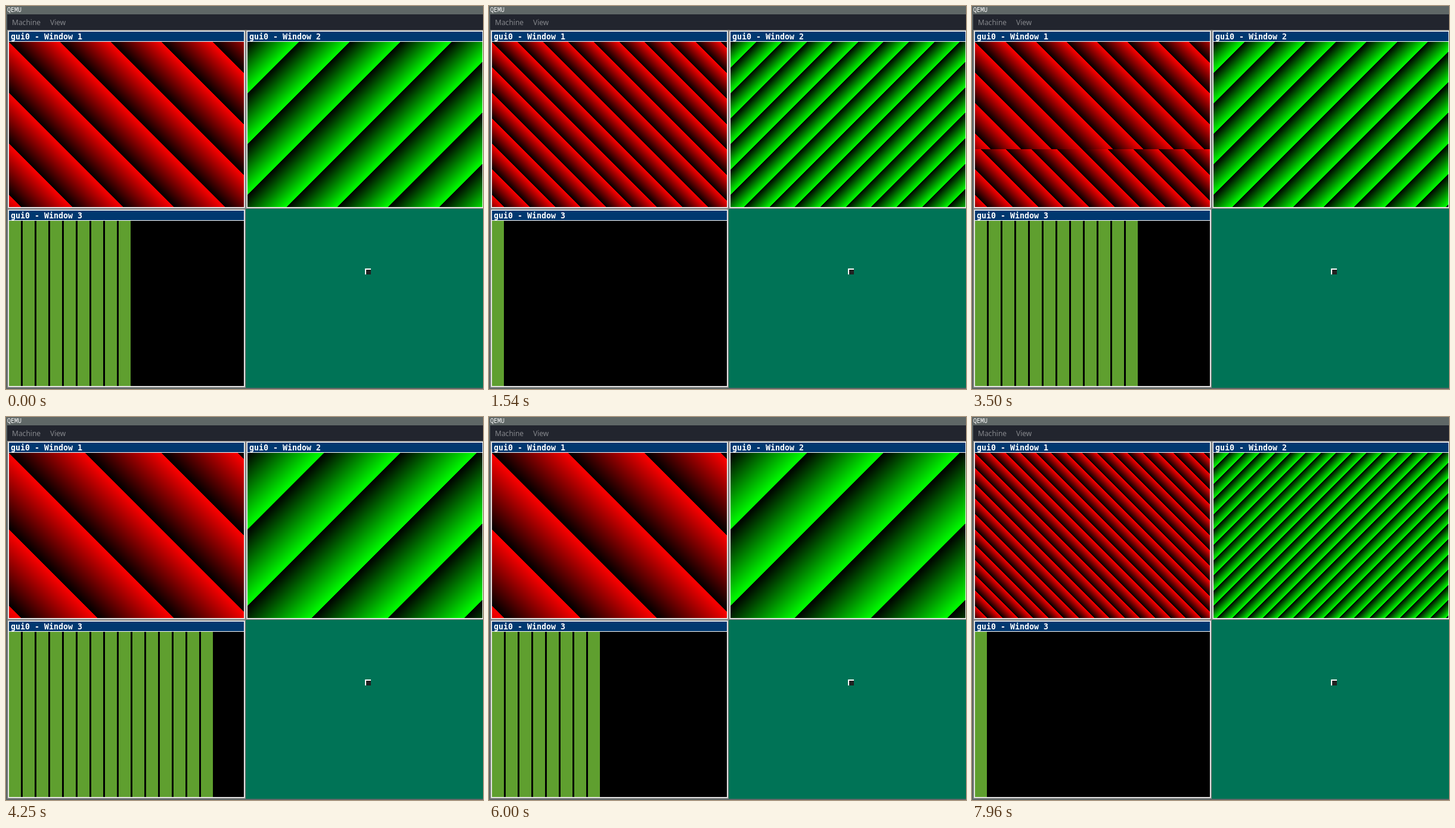
An HTML page with a canvas for the animation above (8 s loop, 800 px wide and 642 px high).

```html
<!DOCTYPE html>
<html lang="en">
<head>
<meta charset="utf-8">
<title>Desktop demo</title>
<style>
  html, body { margin: 0; width: 100%; height: 100%; overflow: hidden; background: #5f6766; }
  svg, canvas { position: absolute; left: 0; top: 0; display: block; }
  .host { font: 10px "Noto Sans Mono", "DejaVu Sans Mono", monospace; fill: #fff; }
  .menu { font: 12px "Noto Sans", sans-serif; fill: #85878c; }
  .title { font: bold 13.29px "DejaVu Sans Mono", monospace; fill: #fff; }
</style>
</head>
<body>
<canvas id="stage" width="800" height="642"></canvas>
<svg width="800" height="642">
  <text class="host" x="2" y="10">QEMU</text>
  <text class="menu" x="10" y="32">Machine</text>
  <text class="menu" x="74" y="32">View</text>
  <text class="title" x="8" y="56">gui0 - Window 1</text>
  <text class="title" x="408" y="56">gui0 - Window 2</text>
  <text class="title" x="8" y="356">gui0 - Window 3</text>
</svg>
<script>
const LOOP = 8000, W = 394, H = 277;
const PAINT = 0.1; // share of a step spent painting it
const ctx = document.getElementById('stage').getContext('2d');

// Steps done by each window at a few key times (ms); even pace in between.
const times = [0, 750, 1040, 1500, 2380, 3500, 4960, 6000, 7960];
const redSteps = [0, 4, 5, 6, 10, 15.96, 23, 28, 38];
const greenSteps = [0, 4, 5, 6, 9, 16, 23, 28, 38];
const barSteps = [9, 14, 16, 17, 22, 28, 34.988, 40, 49];

function progress(steps, t) {
  let i = 0;
  while (i < times.length - 2 && t >= times[i + 1]) i++;
  const u = Math.min(1, (t - times[i]) / (times[i + 1] - times[i]));
  const n = steps[i] + u * (steps[i + 1] - steps[i]) + PAINT;
  const step = Math.floor(n);
  return { step, rows: Math.round(H * Math.min(1, (n - step) / PAINT)) };
}

// The stripe frequency counts down from 10 to 2 and starts over.
const frequency = n => 2 + (((1 - n) % 9) + 9) % 9;

function rect(color, x, y, w, h) {
  ctx.fillStyle = color;
  ctx.fillRect(x, y, w, h);
}

function drawWindow(x, y) {
  ['#808080', '#c0c0c0', '#ffffff'].forEach((c, i) =>
    rect(c, x + i, y + i, 400 - 2 * i, 300 - 2 * i));
  rect('#003870', x + 3, y + 3, W, 16);
  rect('#ffffff', x + 3, y + 19, W, 1);
  rect('#000000', x + 3, y + 20, W, H);
}

function drawDesktop() {
  rect('#5f6766', 0, 0, 800, 642);
  rect('#22252e', 2, 14, 798, 26);
  rect('#007356', 2, 40, 798, 600);
  drawWindow(2, 40);
  drawWindow(402, 40);
  drawWindow(2, 340);
  rect('#ffffff', 602, 440, 10, 10);
  rect('#222222', 604, 442, 8, 8);
}

// New stripes replace the previous ones from the top down.
const image = ctx.createImageData(W, H);
function drawStripes(left, channel, slope, { step, rows }) {
  const px = image.data;
  for (let y = 0, i = 0; y < H; y++) {
    const k = frequency(y < rows ? step : step - 1);
    for (let x = 0; x < W; x++, i += 4) {
      px[i] = px[i + 1] = px[i + 2] = 0;
      px[i + channel] = ((x + slope * y) * k) & 255;
      px[i + 3] = 255;
    }
  }
  ctx.putImageData(image, left, 60);
}

// Bars fill up one by one, each growing from the bottom; 16 make a full row.
function drawBars({ step, rows }) {
  const last = (step - 1) % 16;
  rect('#000000', 5, 360, W, H);
  for (let i = 0; i <= last; i++) {
    const h = i < last ? H : rows;
    rect('#5f9f2f', 5 + 23 * i, 360 + H - h, 20, h);
  }
}

function render(t) {
  drawStripes(5, 0, -1, progress(redSteps, t));
  drawStripes(405, 1, 1, progress(greenSteps, t));
  drawBars(progress(barSteps, t));
}

drawDesktop();
render(0);
const start = performance.now();
function loop() {
  render((performance.now() - start) % LOOP);
  requestAnimationFrame(loop);
}
requestAnimationFrame(loop);
</script>
</body>
</html>
```
